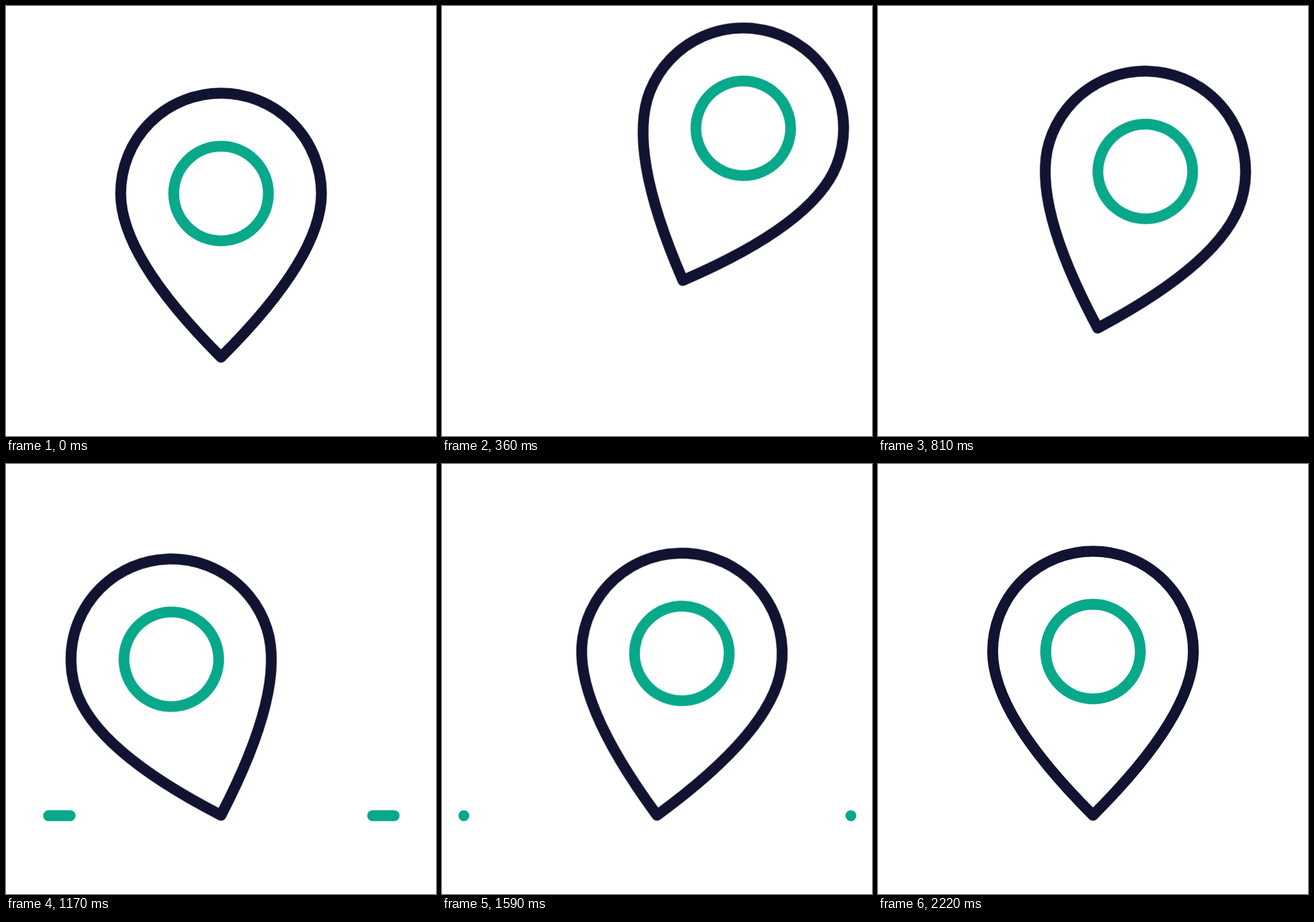
An HTML page that plays this animation: 748x748 px, repeating every 3460 ms.

```html
<!DOCTYPE html>
<html lang="en">
<head>
<meta charset="utf-8">
<title>Jumping map pin</title>
<style>
  @property --head { syntax: "<number>"; inherits: true; initial-value: 0; }
  @property --tail { syntax: "<number>"; inherits: true; initial-value: 0; }

  html, body { margin: 0; width: 100%; height: 100%; overflow: hidden; background: #fff; }
  svg { display: block; width: 100%; height: 100%; }

  .ink { fill: none; stroke-width: 18.9; stroke-linecap: round; stroke-linejoin: round; }
  .navy { stroke: #121331; }
  .green { stroke: #08a88a; }

  .shift, .jump, .swing, .sparks { animation: 3460ms linear infinite; }
  .shift { animation-name: shift; }
  .jump { animation-name: jump; }
  .swing { animation-name: swing; transform-origin: 374px 611px; }
  .sparks { animation-name: head, tail, show; }
  .sparks path {
    stroke-dasharray: calc((var(--head) - var(--tail)) * 1px) 999px;
    stroke-dashoffset: calc(var(--tail) * -1px);
  }

  @keyframes shift {
    0% { transform: translateX(0); animation-timing-function: cubic-bezier(.25, .1, .25, 1); }
    16.763% { transform: translateX(50px); animation-timing-function: cubic-bezier(.33, 0, .67, 1); }
    25.723%, 100% { transform: translateX(0); }
  }
  @keyframes jump {
    0% { transform: translateY(0); animation-timing-function: cubic-bezier(.25, .1, .25, 1); }
    16.763% { transform: translateY(-148.5px); animation-timing-function: cubic-bezier(.33, 0, .83, .83); }
    25.867%, 100% { transform: translateY(0); }
  }
  @keyframes swing {
    0% { transform: rotate(0deg); animation-timing-function: cubic-bezier(.25, .08, .36, 1); }
    16.763% { transform: rotate(25deg); animation-timing-function: cubic-bezier(.72, 0, .67, 1); }
    31.936% { transform: rotate(-19.5deg); animation-timing-function: cubic-bezier(.36, 0, .64, 1); }
    43.931% { transform: rotate(10deg); animation-timing-function: cubic-bezier(.36, 0, .64, 1); }
    54.624% { transform: rotate(-4.2deg); animation-timing-function: cubic-bezier(.36, 0, .64, 1); }
    64.162%, 100% { transform: rotate(0deg); }
  }
  @keyframes head {
    0%, 28.902% { --head: 0; animation-timing-function: cubic-bezier(.12, .44, .28, 1); }
    46.243%, 100% { --head: 112; }
  }
  @keyframes tail {
    0%, 28.902% { --tail: 0; animation-timing-function: cubic-bezier(.33, .33, .67, 1); }
    46.243%, 100% { --tail: 112; }
  }
  @keyframes show {
    0% { opacity: 0; animation-timing-function: step-end; }
    28.902% { opacity: 1; animation-timing-function: step-end; }
    46.39%, 100% { opacity: 0; }
  }
</style>
</head>
<body>
<svg viewBox="0 0 748 748">
  <g class="sparks ink green">
    <path d="M150 611.7H30"/>
    <path d="M599.3 611.7H719.3"/>
  </g>
  <g class="shift"><g class="jump"><g class="swing ink">
    <path class="navy" d="M199.4 326.3A174.6 174.6 0 0 1 548.6 326.3C548.6 438 409 576 374 611C339 576 199.4 438 199.4 326.3Z"/>
    <circle class="green" cx="374" cy="326.3" r="82.3"/>
  </g></g></g>
</svg>
</body>
</html>
```
